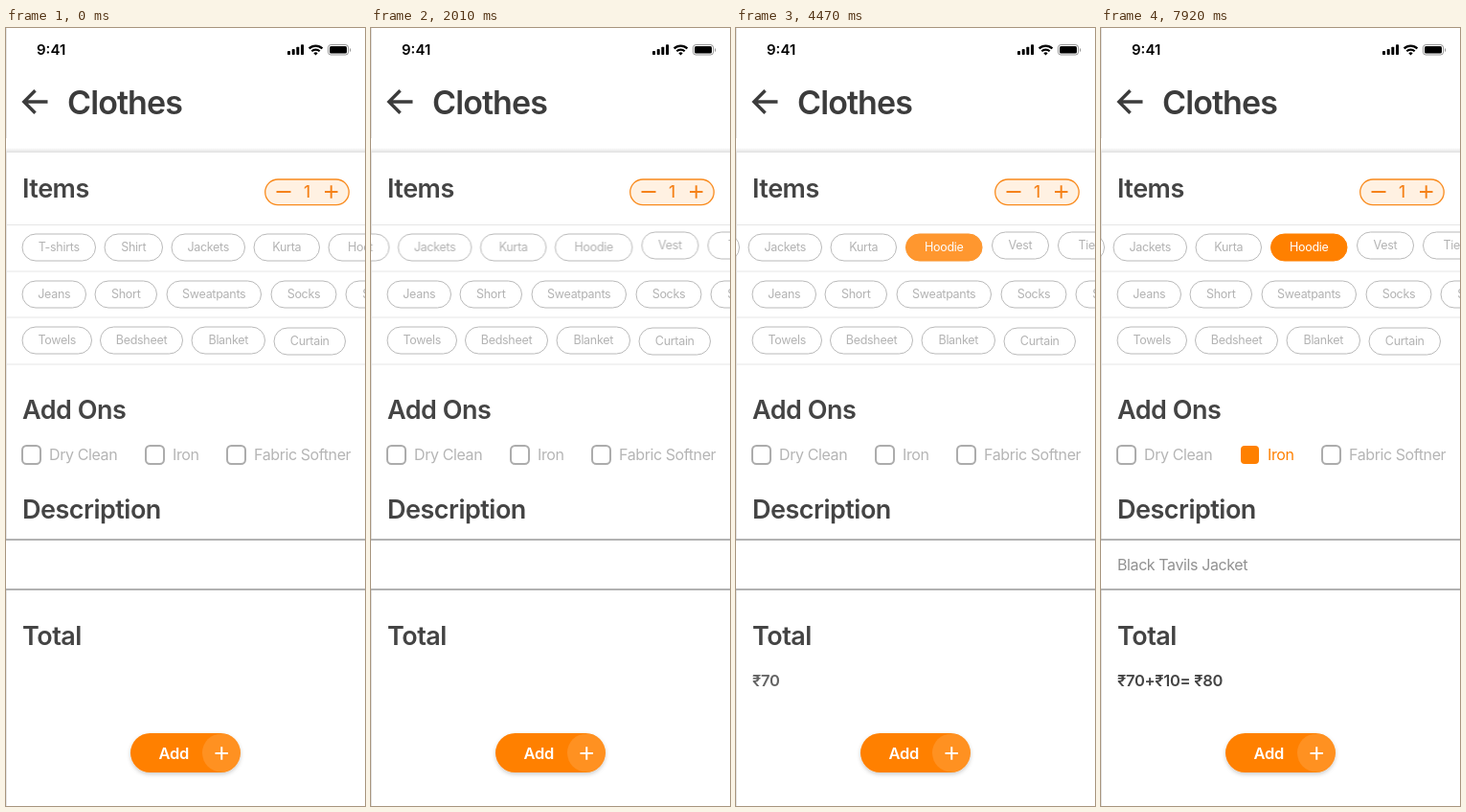
An HTML page for the animation above (8000 ms loop, 375x812 px).

```html
<!DOCTYPE html>
<html lang="en">
<head>
<meta charset="utf-8">
<title>Clothes order</title>
<style>
  html, body { margin: 0; width: 100%; height: 100%; overflow: hidden; background: #fff; }
  svg { display: block; width: 375px; height: 812px; }
  text { font-family: Inter, "Noto Sans", sans-serif; }

  .title { font-size: 34px; font-weight: 600; letter-spacing: -.9px; fill: #3c3c3c; }
  .head { font-size: 27px; font-weight: 600; letter-spacing: -.5px; fill: #444; }
  .pill rect { fill: #fff; stroke: #b9b9b9; }
  .pill text { font-size: 12.5px; letter-spacing: -.3px; text-anchor: middle; fill: #b3b3b3; }
  .pill.on rect { fill: #ff8000; stroke: #ff8000; }
  .pill.on text { fill: #fff; }
  .box { fill: #fff; stroke: #acacac; stroke-width: 2; }
  .label { font-size: 16px; letter-spacing: -.4px; fill: #b5b5b5; }
  .sum { font-size: 16.5px; font-weight: 600; letter-spacing: -.3px; fill: #444; }
  .rule { stroke: #e6e6e6; }
  .edge { stroke: #999; stroke-width: 1.5; }
  .orange { fill: #ff8000; }

  .anim { animation: 8s cubic-bezier(.325, 0, .03, 1) infinite; }
  .scroll { animation-name: scroll; }
  .pick-in { animation-name: pick-in; }
  .pick-out { animation-name: pick-out; }
  .price { animation-name: price; }
  .iron-in { animation-name: iron-in; }
  .iron-out { animation-name: iron-out; }
  .note { animation-name: note; animation-timing-function: cubic-bezier(.42, 0, .8, .85); }

  @keyframes scroll { 0% { transform: translateX(0); } 44.25%, 100% { transform: translateX(-160px); } }
  @keyframes pick-in { 0%, 46.5% { opacity: 0; } 67.5%, 100% { opacity: 1; } }
  @keyframes pick-out { 0%, 46.5% { opacity: 1; } 67.5%, 100% { opacity: 0; } }
  @keyframes price { 0%, 46.5% { opacity: 0; } 66.5%, 67.5% { opacity: 1; } 88.875%, 100% { opacity: 0; } }
  @keyframes iron-in { 0%, 67.5% { opacity: 0; } 88.875%, 100% { opacity: 1; } }
  @keyframes iron-out { 0%, 67.5% { opacity: 1; } 88.875%, 100% { opacity: 0; } }
  @keyframes note { 0%, 92.625% { opacity: 0; } 100% { opacity: .69; } }
</style>
</head>
<body>
<svg viewBox="0 0 375 812">
  <defs>
    <filter id="soft" x="-20%" y="-40%" width="140%" height="200%">
      <feDropShadow dx="0" dy="2" stdDeviation="2" flood-opacity=".2"/>
    </filter>
    <linearGradient id="shade" x2="0" y2="1">
      <stop offset="0" stop-color="#000" stop-opacity="0"/>
      <stop offset="1" stop-color="#000" stop-opacity=".1"/>
    </linearGradient>
  </defs>

  <!-- status bar -->
  <text x="32" y="28" font-size="15" font-weight="600">9:41</text>
  <rect x="294" y="24" width="3" height="4" rx=".8"/>
  <rect x="298.7" y="22" width="3" height="6" rx=".8"/>
  <rect x="303.3" y="19.7" width="3" height="8.3" rx=".8"/>
  <rect x="308" y="17.3" width="3" height="10.7" rx=".8"/>
  <g fill="none" stroke="#000" stroke-width="2.2">
    <path d="M316.6 21.4a9.8 9.8 0 0 1 13.8 0"/>
    <path d="M319.3 24.3a6 6 0 0 1 8.4 0"/>
  </g>
  <path d="M321.3 26.2a3.2 3.2 0 0 1 4.4 0L323.500 28.500z"/>
  <rect x="336.500" y="17.500" width="21" height="10.500" rx="2.800" fill="none" stroke="#000" stroke-opacity=".4"/>
  <rect x="338" y="19" width="18" height="7.500" rx="1.500"/>
  <path d="M359 21v4a2.200 2.200 0 0 0 0-4z" opacity=".4"/>

  <!-- header and card -->
  <path class="rule" d="M.5 0V115M.5 130V533M.5 587V812"/>
  <rect y="125" width="375" height="4" fill="url(#shade)"/>
  <path d="M0 129.500H375" stroke="#e2e2e2"/>
  <path d="M43.500 77H19.500M30.500 65.200L18.800 77L30.500 88.800" fill="none" stroke="#3c3c3c" stroke-width="3.400"/>
  <text class="title" x="64" y="90">Clothes</text>

  <text class="head" x="17" y="177">Items</text>
  <rect x="270.700" y="158" width="87.500" height="26.700" rx="13.350" fill="#fff1e2" stroke="#f98a1c" stroke-width="1.300"/>
  <path d="M282.500 171H297.500M333 171H346.500M339.700 164.200V177.700" stroke="#f5821a" stroke-width="2"/>
  <text x="314.500" y="177" font-size="17" font-weight="500" text-anchor="middle" fill="#f5821a">1</text>
  <path class="rule" d="M0 205.500H375M0 254H375M0 302H375M0 351H375"/>
  <g id="row1" class="anim scroll"></g>
  <g id="rows"></g>

  <text class="head" x="17" y="408">Add Ons</text>
  <g id="addons"></g>

  <text class="head" x="17" y="512">Description</text>
  <path class="edge" d="M0 534H375M0 586H375"/>
  <text class="label anim note" x="17" y="566" style="fill:#444">Black Tavils Jacket</text>

  <text class="head" x="17" y="644">Total</text>
  <text class="sum anim price" x="17" y="687">₹70</text>
  <text class="sum anim iron-in" x="17" y="687">₹70+₹10= ₹80</text>

  <g filter="url(#soft)"><rect class="orange" x="130" y="736" width="115" height="41" rx="20.500"/></g>
  <circle cx="225" cy="756.500" r="20" fill="#fff" fill-opacity=".13"/>
  <path d="M218.500 757H232M225.250 750.200V763.800" stroke="#fff" stroke-width="2"/>
  <text x="159.500" y="763" font-size="16.500" font-weight="600" letter-spacing="-.3" fill="#fff">Add</text>
</svg>
<script>
  const $ = id => document.getElementById(id);

  const pill = (name, x, end, y, cls = '') =>
    `<g class="pill ${cls}"><rect x="${x}" y="${y}" width="${end - x}" height="28" rx="14"/>` +
    `<text x="${(x + end) / 2}" y="${y + 18}">${name}</text></g>`;

  const check = (name, x, cls = '') =>
    `<g class="${cls}"><rect class="box" x="${x}" y="436" width="19" height="19" rx="4.5"/>` +
    `<text class="label" x="${x + 28}" y="451">${name}</text></g>`;

  $('row1').innerHTML =
    pill('T-shirts', 17, 93.5, 215) + pill('Shirt', 103, 163.500, 215) +
    pill('Jackets', 173, 249.500, 215) + pill('Kurta', 259, 327.500, 215) +
    pill('Hoodie', 337, 417.500, 215, 'anim pick-out') +
    pill('Hoodie', 337.500, 417, 215, 'on anim pick-in') +
    pill('Vest', 427.500, 486.500, 213) + pill('Tie', 496.500, 556, 213);

  $('rows').innerHTML =
    pill('Jeans', 17, 83.500, 264) + pill('Short', 93, 157.500, 264) +
    pill('Sweatpants', 168, 266.500, 264) + pill('Socks', 277, 345, 264) +
    pill('Shorts', 355, 426, 264) +
    pill('Towels', 17, 89.500, 312) + pill('Bedsheet', 98.500, 184.500, 312) +
    pill('Blanket', 194, 270.500, 312) + pill('Curtain', 280, 354.500, 313);

  $('addons').innerHTML =
    check('Dry Clean', 17) + check('Iron', 146, 'anim iron-out') + check('Fabric Softner', 231) +
    `<g class="anim iron-in"><rect class="orange" x="146" y="436" width="19" height="19" rx="4"/>` +
    `<text class="label" x="174" y="451" style="fill:#ff8000">Iron</text></g>`;
</script>
</body>
</html>
```
